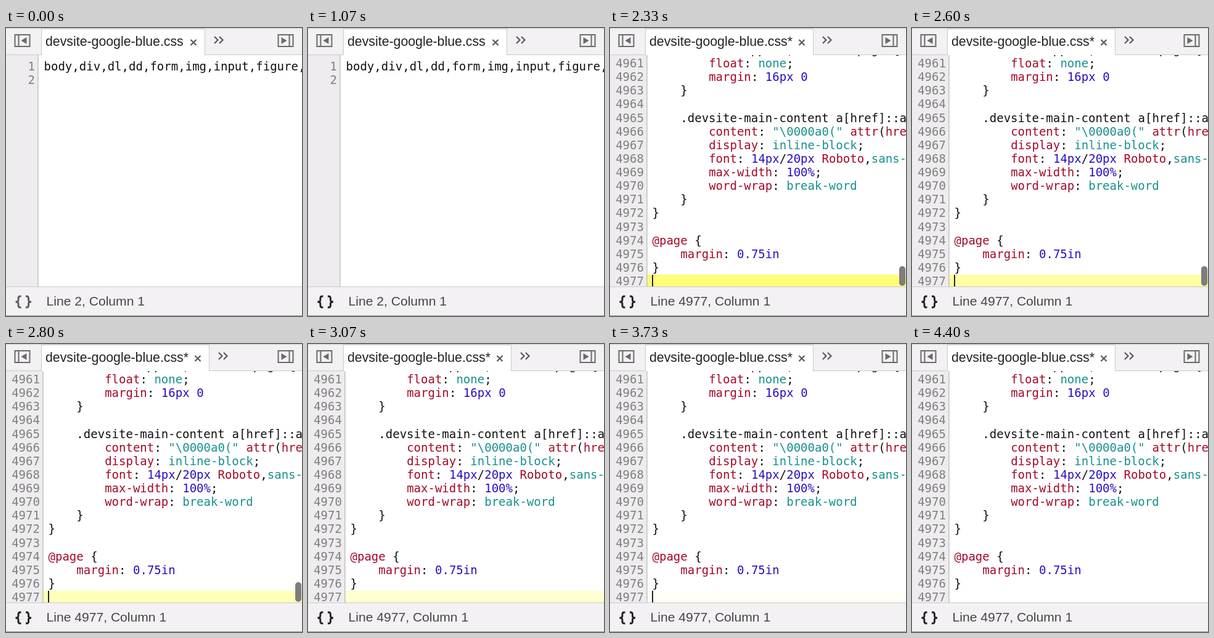
Write an HTML page with a canvas that moves like this. It is 480x468 px and loops after 4.54 s.

```html
<!DOCTYPE html>
<html lang="en">
<head>
<meta charset="utf-8">
<title>Pretty print</title>
<style>
html, body { margin: 0; width: 100%; height: 100%; overflow: hidden; background: #fff; }
canvas { display: block; }
</style>
</head>
<body>
<canvas id="stage" width="480" height="468"></canvas>
<script>
const c = document.getElementById('stage').getContext('2d');
const LOOP = 4540, CHAR = 11.46, ROW = 22.125;
const UI = '"Liberation Sans", Arial, sans-serif';
const MONO = '19px "DejaVu Sans Mono", monospace';
const RED = '#a50a28', TEAL = '#17918d', BLUE = '#2a0fc0', BLACK = '#111';
const KEYWORDS = /^(none|inline-block|sans-serif|break-word)$/;

const minified = ['body,div,dl,dd,form,img,input,figure,menu{margin:0;padding:0}', ''];
const pretty = [
  '    .devsite-appbar,.devsite-page {',
  '        float: none;',
  '        margin: 16px 0',
  '    }',
  '',
  '    .devsite-main-content a[href]::after {',
  '        content: "\\0000a0(" attr(href) ")";',
  '        display: inline-block;',
  '        font: 14px/20px Roboto,sans-serif;',
  '        max-width: 100%;',
  '        word-wrap: break-word',
  '    }',
  '}',
  '',
  '@page {',
  '    margin: 0.75in',
  '}',
  ''
];

function rect(x, y, w, h, color) {
  c.fillStyle = color;
  c.fillRect(x, y, w, h);
}

function text(s, x, y, font, color) {
  c.font = font;
  c.fillStyle = color;
  c.fillText(s, x, y);
}

function stroke(d, color, width) {
  c.strokeStyle = color;
  c.lineWidth = width;
  c.stroke(new Path2D(d));
}

function roundBox(x, y, w, h, r, color) {
  c.fillStyle = color;
  c.beginPath();
  c.roundRect(x, y, w, h, r);
  c.fill();
}

function tokenColor(token) {
  if (token[0] === '"' || KEYWORDS.test(token)) return TEAL;
  if (/^\d/.test(token)) return BLUE;
  return /^[@a-z]/i.test(token) ? RED : BLACK;
}

function codeLine(line, x, y) {
  const plain = /^\s*\.|^body/.test(line);
  const tokens = line.match(/"[^"]*"|@?[a-z][\w-]*|\d[\d.]*[a-z%]*|\s+|./gi) || [];
  for (const token of tokens) {
    text(token, x, y, MONO, plain ? BLACK : tokenColor(token));
    x += token.length * CHAR;
  }
}

function editor(lines, first, baseline, gutter, codeX, highlight) {
  rect(0, 44, 480, 376, '#fff');
  rect(0, 44, gutter, 376, '#eeecee');
  const last = baseline + (lines.length - 1) * ROW;
  if (highlight) rect(gutter + 1, last - 17, 480, ROW, highlight);
  rect(gutter + 0.3, 44, 1.2, 376, '#b0b0b0');
  lines.forEach((line, i) => {
    const y = baseline + i * ROW, number = String(first + i);
    text(number, gutter - 4 - number.length * CHAR, y, MONO, '#808080');
    codeLine(line, codeX, y);
  });
  return last - 17;
}

function panelIcon(x, flip) {
  c.save();
  c.translate(x, 0);
  c.scale(flip, 1);
  stroke('M-12 11H12V30H-12ZM-6 11V30', '#6b6b6b', 2);
  c.fillStyle = '#6b6b6b';
  c.fill(new Path2D('M-2 20.5L7 15V26Z'));
  c.restore();
}

function header(edited) {
  const shift = edited ? 7 : 0;
  rect(0, 0, 480, 44, '#f3f1f3');
  rect(0, 0, 480, 1, '#cfcfcf');
  rect(0, 43, 480, 1, '#cacaca');
  rect(57, 1, 266 + shift, 43, '#cacaca');
  rect(58, 2, 264 + shift, 42, '#fff');
  text('devsite-google-blue.css' + (edited ? '*' : ''), 64, 29, '21.3px ' + UI, '#222');
  c.save();
  c.translate(shift, 0);
  stroke('M299.5 19L308.5 28M308.5 19L299.5 28', '#5c5c5c', 2.3);
  stroke('M338 14L343.5 19.5L338 25M346 14L351.5 19.5L346 25', '#5c5c5c', 2.3);
  c.restore();
  panelIcon(26.5, 1);
  panelIcon(453.5, -1);
}

function footer(hover, line) {
  rect(0, 420, 480, 48, '#f3f1f3');
  rect(0, 420, 480, 1, '#cacaca');
  rect(0, 467, 480, 1, '#8f8f8f');
  const brace = 'M24.5 436H23Q20 436 20 439.5V442Q20 445 15.5 445Q20 445 20 448V451Q20 454 23 454H24.5';
  const color = hover ? '#222' : '#5c5c5c';
  stroke(brace, color, 2.9);
  c.save();
  c.translate(56.5, 0);
  c.scale(-1, 1);
  stroke(brace, color, 2.9);
  c.restore();
  text(`Line ${line}, Column 1`, 65.5, 451, '21.1px ' + UI, '#454545');
}

function tooltip(alpha) {
  c.save();
  c.globalAlpha = alpha;
  roundBox(4, 374, 91, 41, 3, '#f2f2f2');
  text('Format', 17, 402, '19.6px ' + UI, '#333');
  c.restore();
}

const clamp = v => Math.max(0, Math.min(1, v));
const within = (k, from, to) => k >= from && k < to;

function draw(ms) {
  // The screen updates 15 times a second
  const k = Math.floor((ms % LOOP + 4) * 0.015);
  const edited = k >= 35;
  const caret = within(k, 5, 12) || within(k, 21, 29) || within(k, 35, 43) || within(k, 51, 60);
  let top;
  if (edited) {
    const fade = 1 - (1 - clamp((k - 35) / 30)) ** 2.4;
    top = editor(pretty, 4960, 418 - 17 * ROW, 59, 68.5, `rgb(255,255,${120 + 135 * fade})`);
    c.globalAlpha = 1 - clamp((k - 42) / 4);
    roundBox(469, 387, 10, 32, 5, '#7d7d7d');
    c.globalAlpha = 1;
  } else {
    top = editor(minified, 1, 69, 51, 61.5, null);
  }
  if (caret) rect(edited ? 68 : 61, top, 2, 22, '#222');
  header(edited);
  footer(k >= 16, edited ? 4977 : 2);
  if (within(k, 17, 35)) tooltip(k < 29 ? clamp((k - 16) / 2) : k < 30 ? 0.55 : 0.12);
}

function tick(now) {
  draw(now);
  requestAnimationFrame(tick);
}
requestAnimationFrame(tick);
</script>
</body>
</html>
```
